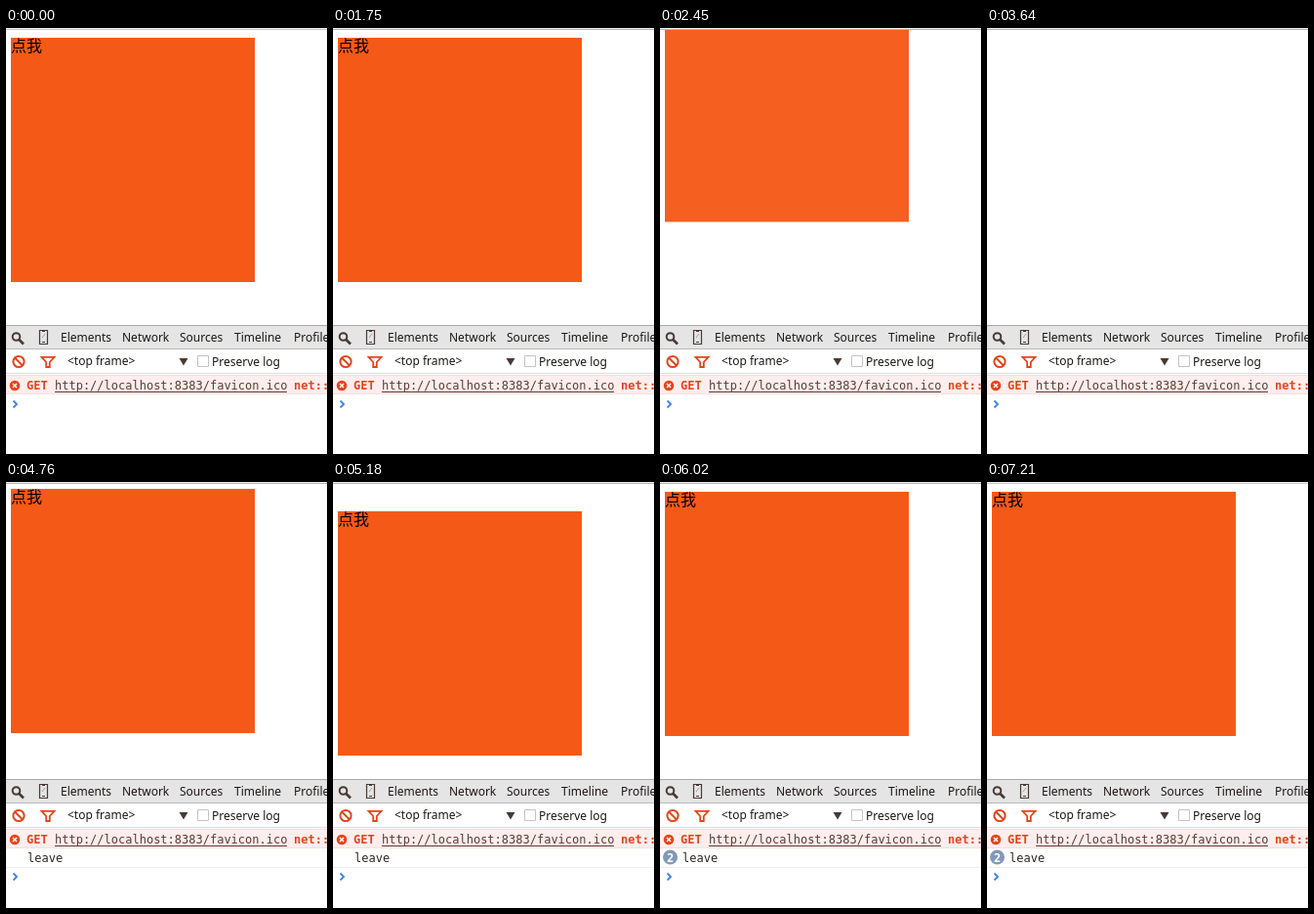
An HTML page with a canvas for the animation above (7.28 s loop, 329 by 436 pixels).

```html
<!DOCTYPE html>
<html lang="zh">
<head>
<meta charset="utf-8">
<style>
  html, body { margin: 0; width: 100%; height: 100%; overflow: hidden; background: #fff; }
  canvas { display: block; width: 329px; height: 436px; }
</style>
</head>
<body>
<canvas id="stage" width="329" height="436"></canvas>
<script>
const ctx = document.getElementById('stage').getContext('2d');
const W = 329, H = 436, LOOP = 7280, STEP = 70;
const UI = '12px "Noto Sans", "Open Sans", sans-serif';
const MONO = '12px "DejaVu Sans Mono", monospace';
const CJK = '16px "Noto Sans CJK SC", "Noto Sans CJK", sans-serif';
const ORANGE = '#f55917', RED = '#e5451b', INK = '#483a34';

function rect(x, y, w, h, color) {
  ctx.fillStyle = color;
  ctx.fillRect(x, y, w, h);
}
function text(str, x, y, font, color) {
  ctx.font = font;
  ctx.fillStyle = color;
  ctx.fillText(str, x, y);
}
function trace(points, close) {
  ctx.beginPath();
  points.forEach(([x, y]) => ctx.lineTo(x, y));
  if (close) ctx.closePath();
}
function line(points, color, width, close) {
  trace(points, close);
  ctx.strokeStyle = color;
  ctx.lineWidth = width;
  ctx.stroke();
}
function disc(x, y, r, color) {
  ctx.beginPath();
  ctx.arc(x, y, r, 0, 7);
  ctx.fillStyle = color;
  ctx.fill();
}
function ring(x, y, r, color, width) {
  ctx.beginPath();
  ctx.arc(x, y, r, 0, 7);
  ctx.strokeStyle = color;
  ctx.lineWidth = width;
  ctx.stroke();
}

// cubic-bezier(.25, .1, .25, 1)
function ease(x) {
  const bez = (a, b, s) => 3 * a * s * (1 - s) ** 2 + 3 * b * s * s * (1 - s) + s ** 3;
  let lo = 0, hi = 1;
  for (let i = 0; i < 24; i++) {
    const mid = (lo + hi) / 2;
    if (bez(0.25, 0.25, mid) < x) lo = mid; else hi = mid;
  }
  return bez(0.1, 1, lo);
}

// Bounce-out-up: a small lift, a dip, then a fast exit through the top.
function bounceOut(p) {
  if (p < 0.2) return { y: -10 * ease(p / 0.2), alpha: 1 };
  if (p < 0.4) return { y: -10 + 30 * ease((p - 0.2) / 0.2), alpha: 1 };
  if (p < 0.45) return { y: 20, alpha: 1 };
  const k = ease(Math.min(1, (p - 0.45) / 0.55));
  return { y: 20 - 2020 * k, alpha: 1 - k };
}

const exits = [
  { start: 1960, end: 3780, lead: 15 },
  { start: 4760, end: 6020, lead: 40 }
];

function boxState(t) {
  const run = exits.find(e => t >= e.start && t < e.end);
  return run ? bounceOut(((t - run.start) / 1.05 + run.lead) / 1000) : { y: 0, alpha: 1 };
}

function drawPage(t) {
  const { y, alpha } = boxState(t);
  ctx.save();
  ctx.beginPath();
  ctx.rect(0, 2, W, 302);
  ctx.clip();
  ctx.globalAlpha = alpha;
  if (y > -260) {
    rect(5, 10 + y, 250, 250, ORANGE);
    text('点我', 5, 24 + y, CJK, '#000');
  }
  ctx.restore();
  rect(0, 0, W, 1, '#f2f2f2');
  rect(0, 1, W, 1, t < 630 || t >= 7140 ? '#cacaca' : '#b4b4b4');
}

function drawTabs() {
  rect(0, 304, W, 1, '#a8a8a8');
  rect(0, 305, W, 23, '#e6e5e5');
  rect(0, 328, W, 1, '#b8b8b8');
  ring(10.5, 316, 3.8, INK, 2);
  line([[13.5, 319], [18, 323.5]], INK, 2.6);
  line([[34.5, 309.5], [42.5, 309.5], [42.5, 323.5], [34.5, 323.5]], INK, 1.2, true);
  rect(37, 310, 3, 1, INK);
  rect(37, 321, 3, 1, INK);
  line([[37, 317], [40, 313]], '#a8a09c', 1);
  [['Elements', 56], ['Network', 119], ['Sources', 178], ['Timeline', 234], ['Profiles', 295]]
    .forEach(([name, x]) => text(name, x, 321, UI, '#1c1816'));
}

function drawFilterBar() {
  ring(13, 341.5, 5.6, RED, 2);
  line([[9, 337.5], [17, 345.5]], RED, 2);
  line([[36.5, 336.8], [49.5, 336.8], [44.8, 342], [44.8, 347], [41.2, 347], [41.2, 342]], RED, 1.8, true);
  text('<top frame>', 63, 345, UI, '#1c1816');
  trace([[177.5, 338], [186.5, 338], [182, 345.5]], true);
  ctx.fillStyle = INK;
  ctx.fill();
  line([[196.5, 335.5], [207.5, 335.5], [207.5, 346.5], [196.5, 346.5]], '#c4c4c4', 1, true);
  text('Preserve log', 211, 346, UI, '#1c1816');
  rect(0, 353, W, 1, '#dcdcdc');
}

function drawConsole(t) {
  rect(0, 355, W, 20, '#ffeeed');
  rect(0, 355, W, 1, '#fcdcd9');
  rect(0, 374, W, 1, '#fcdcd9');
  disc(9, 366, 5.3, RED);
  line([[7, 364], [11, 368]], '#fff', 1.5);
  line([[11, 364], [7, 368]], '#fff', 1.5);
  text('GET', 21, 370, 'bold ' + MONO, RED);
  text('http://localhost:8383/favicon.ico', 50, 370, MONO, '#5c3c34');
  rect(50, 372, 238, 1, '#5c3c34');
  text('net::', 295, 370, 'bold ' + MONO, RED);

  const logs = exits.filter(e => t >= e.end).length;
  if (logs) {
    text('leave', logs > 1 ? 23 : 22, 389, MONO, '#2a2522');
    rect(0, 394, W, 1, '#f0f0f0');
  }
  if (logs > 1) {
    disc(10.5, 384, 7.5, '#8199b8');
    text('2', 7, 388.5, 'bold ' + MONO, '#fff');
  }
  const y = logs ? 404 : 385;
  line([[7.5, y - 3.5], [11, y], [7.5, y + 3.5]], '#3b82f0', 1.8);
}

function draw(now) {
  const t = Math.floor((now % LOOP) / STEP) * STEP;
  rect(0, 0, W, H, '#fff');
  drawPage(t);
  drawTabs();
  drawFilterBar();
  drawConsole(t);
}

let origin = null;
function tick(now) {
  if (origin === null) origin = now;
  draw(now - origin);
  requestAnimationFrame(tick);
}
draw(0);
requestAnimationFrame(tick);
</script>
</body>
</html>
```
